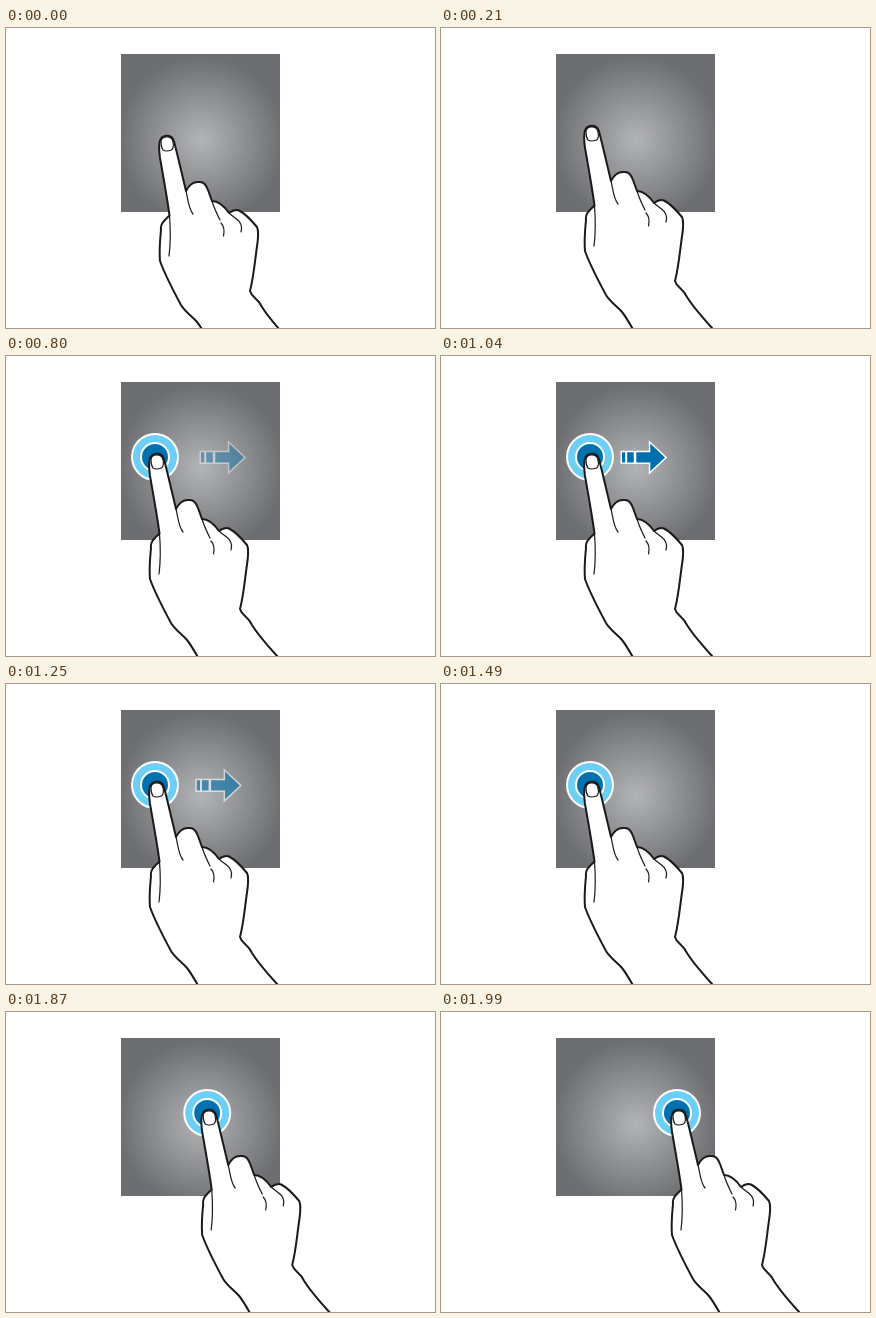
Animation, 429 px wide and 300 px high, one loop 2220 ms. Source, as an HTML page:

```html
<!DOCTYPE html>
<html lang="en">
<head>
<meta charset="utf-8">
<title>Touch, hold and drag</title>
<style>
html, body { margin: 0; width: 100%; height: 100%; overflow: hidden; background: #fff; }
svg { display: block; width: 429px; height: 300px; }
</style>
</head>
<body>
<svg viewBox="0 0 429 300">
  <defs>
    <radialGradient id="glow" gradientUnits="userSpaceOnUse" cx="195" cy="112" r="83">
      <stop offset="0" stop-color="#b3b4b6"/>
      <stop offset="1" stop-color="#6d6e71"/>
    </radialGradient>
  </defs>
  <rect x="115" y="26" width="159" height="158" fill="url(#glow)"/>

  <g id="arrow" fill="#006fae" stroke="#fff" stroke-width="3" paint-order="stroke" stroke-miterlimit="6">
    <path d="M181 96.2h3.2v10.4h-3.2zM186.2 96.2h6.6v10.4h-6.6z"/>
    <path d="M195.3 96.2H209.3V87.6L224 101.4L209.3 115.2V106.6H195.3z"/>
  </g>

  <g id="ring">
    <circle cx="149" cy="101" r="24" fill="#fff"/>
    <circle cx="149" cy="101" r="22" fill="#6dcff6"/>
    <circle cx="149" cy="101" r="15" fill="#fff"/>
    <circle cx="149" cy="101" r="13" fill="#0071b0"/>
  </g>

  <g id="hand" fill="none" stroke="#1a1a1a" stroke-width="2" stroke-linecap="round" stroke-linejoin="round">
    <path fill="#fff" d="M197 310C191 300 186 290 181 284C176 278 170 275 165 267C158 254 149 237 144 223
      C143 212 144 202 145 192C144 186 148 183 153.500 177.500C151 159 147 137 144 120C143 113 142.500 107 144 102.500
      C146 96.500 155 95.800 157.500 102C160 110 163 124 165.500 134L170 153C173 147 177 143.500 183 144
      C188 143.500 190 147 192 152L196 163C203 163 208 168 213 175C217 172 220 171 223 172.500
      C230 176 236 183 241 189C243 193 242 199 241.500 205C239 221 238 238 234 253
      C236 260 241 259 246 269C254 282 264 292 280 310"/>
    <g stroke-width="1.2">
      <path d="M145 104C145 97.500 156 97 157 104C157.800 108 157 111 155.500 112C152 113.300 149 113.300 147 112C145.500 110 145 107 145 104"/>
      <path d="M153.500 177.500C154.500 190 154.500 206 153 218"/>
      <path d="M170 153C172 161 172.500 171 177 176"/>
      <path d="M196 163C198 170 201 176 204 182M205 185C208 188 208.500 193 207.500 198"/>
      <path d="M213 175C218 180 228 183 225 194"/>
    </g>
  </g>
</svg>
<script>
const LOOP = 2220, STEP = 30;
const [arrow, ring, hand] = ["arrow", "ring", "hand"].map(id => document.getElementById(id));
const clamp = v => Math.min(1, Math.max(0, v));
const steps = (t, from) => Math.floor((t - from) / STEP);
const place = (el, x, y, opacity = 1) => {
  el.setAttribute("transform", `translate(${x} ${y})`);
  el.setAttribute("opacity", opacity);
};

function draw(t) {
  // The finger lands, then the touch rings fade in.
  const away = 10 * (1 - clamp(steps(t, 0) / 7));
  const drag = 87 * clamp(steps(t, 1690) / 10);
  place(hand, away + drag, away);
  place(ring, drag, 0, clamp(steps(t, 210) / 3));

  // The arrow drifts right and fades, twice.
  const k = steps(t, t < 1040 ? 500 : 1040);
  const shown = t >= 500 && t < 1490;
  place(arrow, 1.4 * k, 0, shown ? clamp(1 - k / 17) : 0);
}

const start = performance.now();
function tick() {
  draw((performance.now() - start) % LOOP);
  requestAnimationFrame(tick);
}
tick();
</script>
</body>
</html>
```
